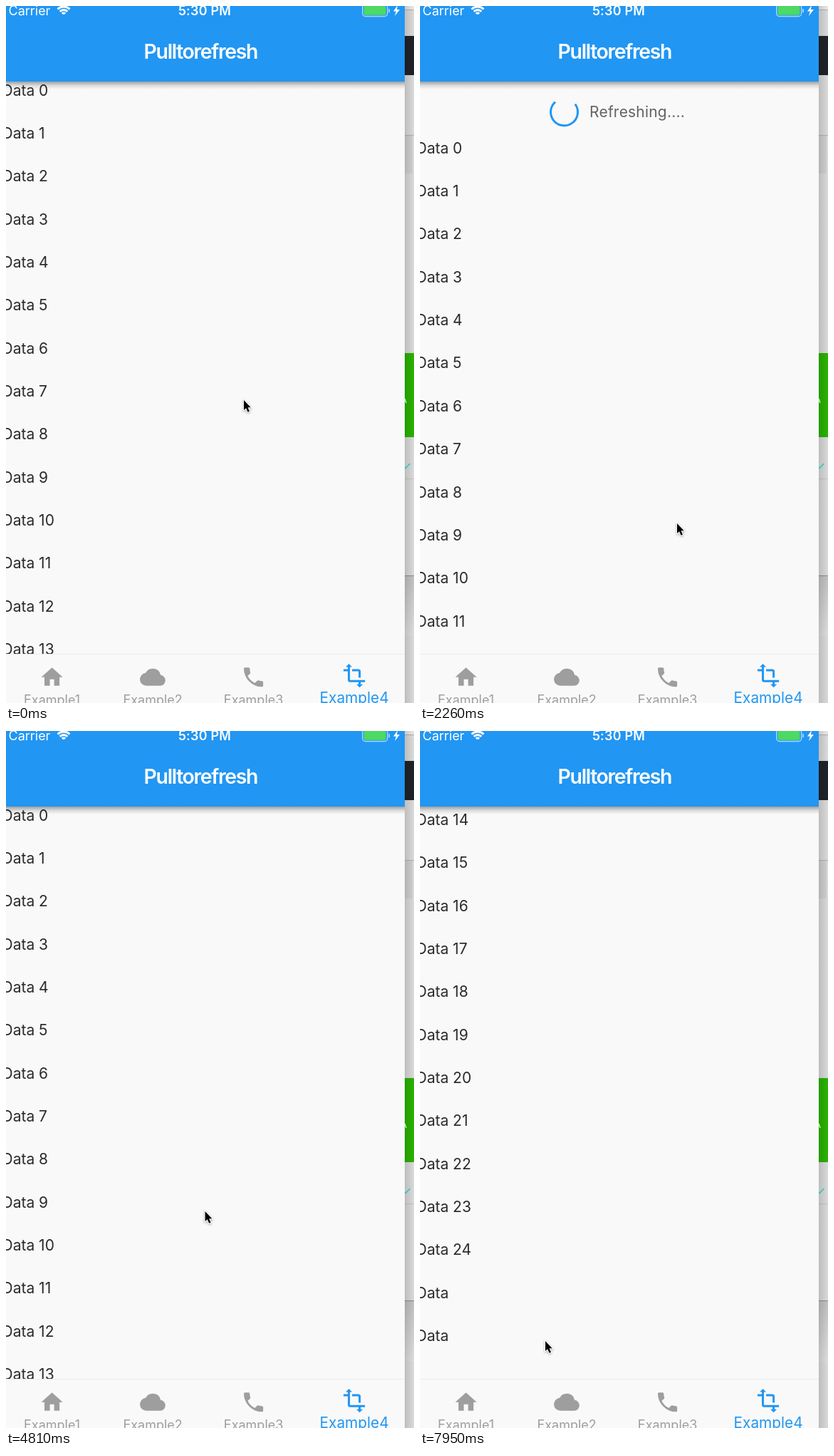
These frames come from a looping animation (573 px wide and 978 px high, 8 s). An HTML page with a canvas:

```html
<!DOCTYPE html>
<html lang="en">
<head>
<meta charset="utf-8">
<title>Pull to refresh</title>
<style>
html, body { margin: 0; width: 100%; height: 100%; overflow: hidden; background: #f9f9f9; }
canvas { display: block; }
</style>
</head>
<body>
<canvas id="stage" width="573" height="978"></canvas>
<script>
const c = document.getElementById('stage').getContext('2d');
const LOOP = 8000, ROW = 60.35, PT = 1.508, MID = 277;
const TOP = 118, HEADER = 75.4, VIEW = 804, SCROLL = 838.6, OVERSHOOT = 2.9;
const GRAB = 450, RELEASE = 1900, FAIL = 3700, LOADED = 7830;
const BLUE = '#2196f3', GREY = '#9e9e9e';

const tabIcons = [
  'M10 20v-6h4v6h5v-8h3L12 3 2 12h3v8z',
  'M6 20a6 6 0 0 1-.65-11.96 7.5 7.5 0 0 1 14 2A5 5 0 0 1 19 20z',
  'M6.6 10.8a15 15 0 0 0 6.6 6.6l2.2-2.2a1 1 0 0 1 1-.25 11 11 0 0 0 3.6.6 1 1 0 0 1 1 1V20a1 1 0 0 1-1 1A17 17 0 0 1 3 4a1 1 0 0 1 1-1h3.5a1 1 0 0 1 1 1 11 11 0 0 0 .6 3.6 1 1 0 0 1-.25 1z',
  'M22 18v-2H8V4h2L7 1 4 4h2v2H2v2h4v8c0 1.1.9 2 2 2h8v2h-2l3 3 3-3h-2v-2h4zM10 8h6v6h2V8c0-1.1-.9-2-2-2h-6v2z'
].map(d => new Path2D(d));
const marks = {
  down: new Path2D('M12 4V19M4.7 11.3L12 18.6l7.3-7.3'),
  up: new Path2D('M12 20V5M4.7 12.7L12 5.4l7.3 7.3'),
  close: new Path2D('M5.7 5.7L18.3 18.3M18.3 5.7L5.7 18.3')
};
const arrow = new Path2D('M0 0V14L3.1 11.3 5.6 16.8 8 15.8 5.6 10.3H9.8Z');
const bolt = new Path2D('M550-1L544 7.5H547.8L546 14 553 5H549Z');

// Turning points of the hand: time, x, y
const hand = [[0, 334, 553], [GRAB, 345, 410], [1190, 335, 550], [1840, 386, 962], [2260, 361, 726],
  [4340, 307, 573], [5250, 255, 765], [5630, 276, 618], [6390, 220, 812], [7700, 207, 832], [7950, 176, 856]];

const clamp = x => Math.min(1, Math.max(0, x));
const smooth = u => u * u * (3 - 2 * u);
const glide = (t, from, to) => smooth(clamp((t - from) / (to - from)));

function handAt(t) {
  const next = hand.findIndex(k => k[0] > t);
  if (next < 0) return hand.at(-1).slice(1);
  const [t0, x0, y0] = hand[next - 1], [t1, x1, y1] = hand[next];
  const u = glide(t, t0, t1);
  return [x0 + (x1 - x0) * u, y0 + (y1 - y0) * u];
}

// The further the list is pulled, the less it follows the hand
const rubber = drag => VIEW * (1 - 1 / (1 + .545 * drag / VIEW));

// Centre of the first row
function listTop(t) {
  if (t < GRAB) return TOP;
  const pull = rubber(handAt(Math.min(t, 1840))[1] - hand[1][2]);
  if (t < RELEASE) return TOP + pull;
  const spring = (pull - HEADER) * Math.exp((RELEASE - t) / 112);
  const nudge = 68 * Math.sin(Math.PI * clamp((t - 2800) / 700)) ** 2;
  const open = HEADER * (1 - glide(t, 4200, 4600));
  const scroll = (SCROLL + OVERSHOOT) * glide(t, 5471, 6390) - OVERSHOOT * glide(t, 6390, 6700);
  return TOP + open + spring - nudge - scroll;
}

// cubic-bezier(.4, 0, .2, 1), solved by bisection
function ease(x) {
  let lo = 0, hi = 1;
  for (let i = 0; i < 20; i++) {
    const s = (lo + hi) / 2;
    if (1.2 * s * (1 - s) ** 2 + .6 * s * s * (1 - s) + s ** 3 < clamp(x)) lo = s; else hi = s;
  }
  return smooth(lo);
}

function rect(x, y, w, h, color) {
  c.fillStyle = color;
  c.fillRect(x, y, w, h);
}

function font(size, weight = 400, spacing = 0) {
  c.font = `${weight} ${size}px Inter, Roboto, sans-serif`;
  c.letterSpacing = spacing + 'px';
}

function text(s, x, y, color, align = 'left') {
  c.textAlign = align;
  c.fillStyle = color;
  c.fillText(s, x, y);
}

function icon(path, x, y, color, outline) {
  c.save();
  c.translate(x - 12 * PT, y - 12 * PT);
  c.scale(PT, PT);
  c.fillStyle = c.strokeStyle = color;
  c.lineWidth = 2;
  if (outline) c.stroke(path); else c.fill(path);
  c.restore();
}

function fade(x0, y0, x1, y1, ...colors) {
  const g = c.createLinearGradient(x0, y0, x1, y1);
  colors.forEach((color, i) => g.addColorStop(i / (colors.length - 1), color));
  return g;
}

function stroke(color, width, draw) {
  c.strokeStyle = color;
  c.lineWidth = width;
  c.beginPath();
  draw();
  c.stroke();
}

function spinner(x, y, ms) {
  const turn = ms / 1333, step = Math.floor(turn), p = turn - step;
  const head = ease(p * 2) * 1.5, tail = ease(p * 2 - 1) * 1.5;
  const start = (-.5 + tail + p * 1.7 - step * .8) * Math.PI;
  stroke(BLUE, 3, () => c.arc(x, y, 19, start, start + Math.max(.01, head - tail) * Math.PI));
}

function header(t, y, pull) {
  const [label, mark] = t >= FAIL ? ['Refresh Failed', 'close']
    : t >= RELEASE + 30 ? ['Refreshing....']
    : pull > HEADER ? ['Refresh when release', 'up'] : ['pull down refresh', 'down'];
  const size = mark ? 36 : 41;
  font(21, 400, .2);
  const left = MID - (size + 15 + c.measureText(label).width) / 2;
  text(label, left + size + 15, y + 7.5, '#636363');
  if (mark) icon(marks[mark], left + size / 2, y, GREY, true);
  else spinner(left + size / 2, y, t + 2286);
}

function list(t) {
  const y = listTop(t), loaded = t >= LOADED;
  c.save();
  c.beginPath();
  c.rect(0, 106, 560, 803);
  c.clip();
  rect(0, 106, 560, 803, '#f9f9f9');
  if (y > TOP + 1) header(t, y - 50.3, y - TOP);
  font(21);
  for (let i = 0; i < (loaded ? 27 : 26); i++)
    text(i < 25 ? 'Data ' + i : 'Data', -5.5, y + i * ROW + 7.6, '#2a2a2a');
  if (!loaded) spinner(MID, y + 25 * ROW + 86, t + 4942);
  c.restore();
}

function statusBar() {
  font(18);
  text('Carrier', 3.5, 13, '#fff');
  font(18, 600, .2);
  text('5:30 PM', 279, 13, '#fff', 'center');
  for (const r of [3, 7.5, 12])
    stroke('#fff', 3, () => c.arc(81, 13, r, -Math.PI * .75, -Math.PI * .25));
  stroke('#a9d6fa', 1.4, () => c.roundRect(500.7, -2, 35, 16.5, 4));
  c.fillStyle = '#4cd964';
  c.beginPath();
  c.roundRect(502.5, 0, 31, 12.7, 2);
  c.fill();
  rect(537.3, 4, 1.7, 5, '#a9d6fa');
  c.fillStyle = '#fff';
  c.fill(bolt);
}

function appBar() {
  rect(0, 106, 560, 11, fade(0, 106, 0, 117, 'rgba(0,0,0,.36)', 'rgba(0,0,0,.12)', 'rgba(0,0,0,0)'));
  rect(0, 0, 560, 106, BLUE);
  statusBar();
  font(28.5, 600, -1.4);
  text('Pulltorefresh', 273.3, 74, '#fff', 'center');
}

function tabs() {
  rect(0, 909, 560, 69, '#f9f9f9');
  rect(0, 909, 560, 1, '#ececec');
  tabIcons.forEach((path, i) => {
    const on = i === 3, x = 64.6 + i * 141.5, color = on ? BLUE : GREY;
    icon(path, x, on ? 939.6 : 941.8, color);
    font(on ? 20.8 : 18);
    text('Example' + (i + 1), x, on ? 978.3 : 980, color, 'center');
  });
}

// Windows behind the phone, seen along the right edge
function backdrop() {
  const band = (y, h, color) => rect(560, y, 13, h, color);
  band(0, 978, '#dedede');
  band(0, 5, '#ececec');
  band(5, 1, '#b5b5b5');
  band(42, 55, '#202428');
  band(181, 1, '#b4b4b4');
  rect(560, 182, 11, 53, '#d3d3d3');
  band(487, 118, '#2ab600');
  band(663, 1, '#c8c8c8');
  band(799, 85, fade(0, 799, 0, 884, '#c4c4c4', '#e2e2e2'));
  band(799, 1, '#8e8e8e');
  band(0, 978, fade(560, 0, 573, 0, 'rgba(0,0,0,.15)', 'rgba(0,0,0,.02)'));
  stroke('#d9f0d2', 1.5, () => { c.moveTo(560, 551); c.lineTo(562, 557); });
  stroke('#35c4b5', 1.6, () => { c.moveTo(558, 645); c.lineTo(561, 648.5); c.lineTo(567.5, 642); });
}

function pointer(t) {
  c.save();
  c.translate(...handAt(t));
  c.shadowColor = 'rgba(0,0,0,.35)';
  c.shadowBlur = 3;
  c.shadowOffsetY = 1;
  c.strokeStyle = '#fff';
  c.lineWidth = 2;
  c.stroke(arrow);
  c.shadowColor = 'transparent';
  c.fillStyle = '#000';
  c.fill(arrow);
  c.restore();
}

function frame() {
  const t = performance.now() % LOOP;
  backdrop();
  list(t);
  appBar();
  tabs();
  pointer(t);
  requestAnimationFrame(frame);
}
frame();
</script>
</body>
</html>
```
